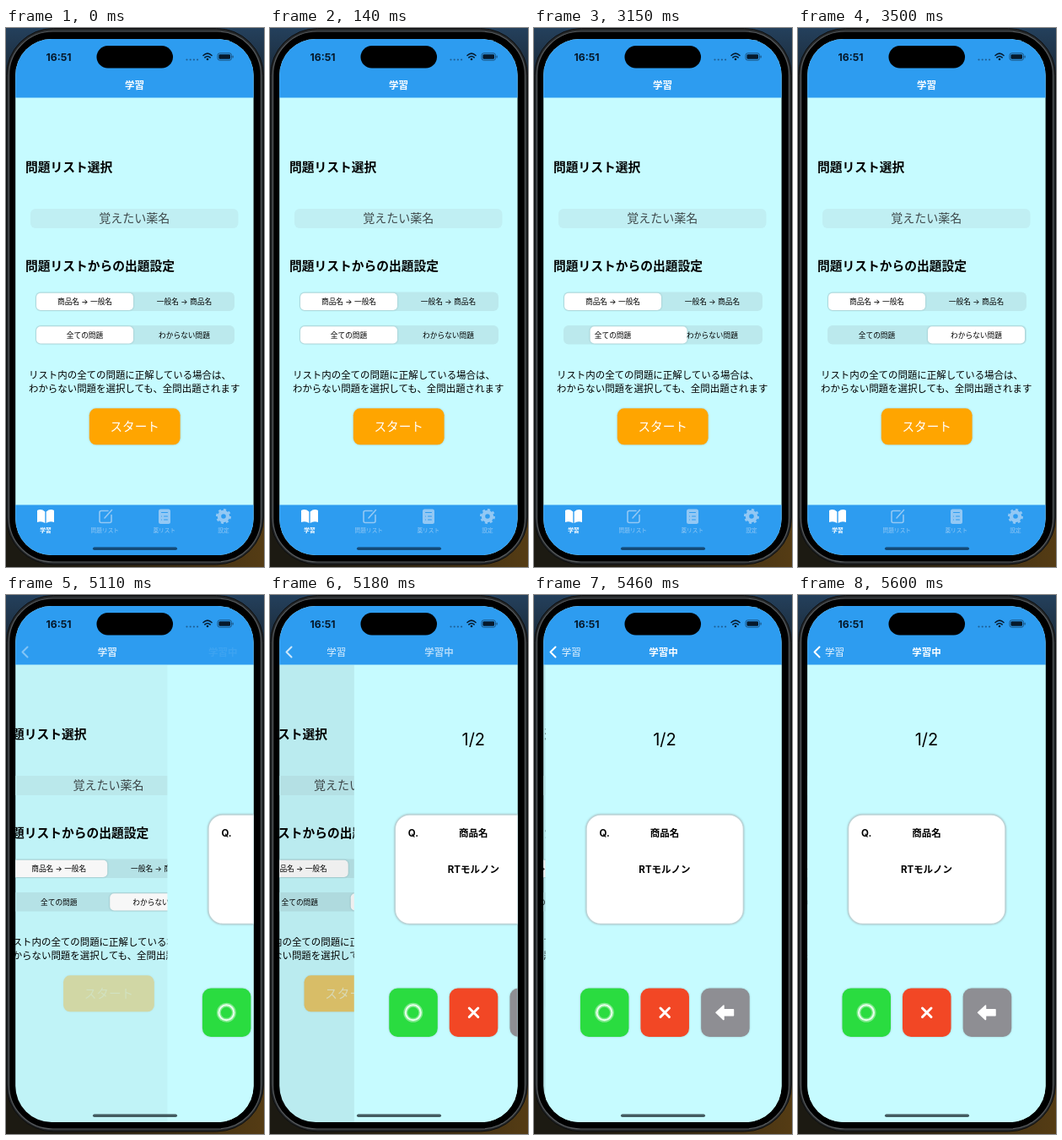
Recreate the animation shown at these times as an HTML page. Size 306 px wide and 638 px high, loop 9.94 s.

```html
<!DOCTYPE html>
<html lang="ja">
<head>
<meta charset="utf-8">
<title>学習</title>
<style>
  html, body { margin: 0; width: 100%; height: 100%; overflow: hidden; background: #000; }
  svg { display: block; width: 306px; height: 638px; }
  text { font-family: Inter, "Noto Sans CJK JP", "Noto Sans CJK", sans-serif; }
  .mid { text-anchor: middle; }
  .bold { font-weight: 700; }
  .h { font-size: 14.75px; font-weight: 700; }
  .nav { font-size: 11.5px; fill: #fff; }
  .seg { font-size: 8.7px; }
  .body { font-size: 11.45px; }
  .card { font-size: 11.5px; font-weight: 700; }
  .tab { font-size: 6.7px; }
  .thumb { fill: #fff; filter: drop-shadow(0 .5px 1px #0003); }
  .soft { filter: drop-shadow(.5px .5px 1px #0003); }
  .line { fill: none; stroke-linecap: round; stroke-linejoin: round; }
</style>
</head>
<body>
<svg viewBox="0 0 306 638">
  <defs>
    <linearGradient id="desk" x2="0" y2="1">
      <stop offset="0" stop-color="#24405c"/>
      <stop offset=".12" stop-color="#18222c"/>
      <stop offset="1" stop-color="#14130f"/>
    </linearGradient>
    <linearGradient id="wood">
      <stop offset=".2" stop-color="#1c1a12"/>
      <stop offset="1" stop-color="#553c14"/>
    </linearGradient>
    <clipPath id="screen"><rect x="11.2" y="13" width="282.4" height="611" rx="43"/></clipPath>
  </defs>

  <rect width="306" height="638" fill="url(#desk)"/>
  <rect y="575" width="306" height="63" fill="url(#wood)"/>
  <rect x=".5" y=".5" width="305" height="634.5" rx="56" fill="#25282a" stroke="#0c0d0e"/>
  <rect x="3.5" y="4" width="299" height="628" rx="52" fill="#000" stroke="#55595c" stroke-width="1.2"/>

  <g clip-path="url(#screen)">
    <rect y="13" width="306" height="611" fill="#c6fbff"/>

    <g id="setup">
      <text class="h" x="23" y="170">問題リスト選択</text>
      <rect x="29" y="214" width="246.500" height="23" rx="6" fill="#c0eff3"/>
      <text class="mid" x="152.300" y="230.400" font-size="14" fill="#3f4a4c">覚えたい薬名</text>
      <text class="h" x="23" y="287">問題リストからの出題設定</text>

      <rect x="35" y="312.500" width="236" height="22.500" rx="6" fill="#bbe9ed"/>
      <rect class="thumb" x="36" y="313.700" width="115" height="20.200" rx="5"/>
      <text class="seg mid" x="93.500" y="327.300" font-weight="500">商品名 → 一般名</text>
      <text class="seg mid" x="211.500" y="327.300">一般名 → 商品名</text>

      <rect x="35" y="352" width="236" height="22.500" rx="6" fill="#bbe9ed"/>
      <rect class="thumb" id="thumb" x="36" y="353.200" width="115" height="20.200" rx="5"/>
      <text class="seg mid" id="all" x="93.500" y="366.800">全ての問題</text>
      <text class="seg mid" id="unknown" x="211.500" y="366.800">わからない問題</text>

      <text class="body" x="27" y="414.600">リスト内の全ての問題に正解している場合は、</text>
      <text class="body" x="27" y="430.600">わからない問題を選択しても、全問出題されます</text>
      <g id="start">
        <rect class="soft" x="98.800" y="450.300" width="107.800" height="43" rx="8" fill="#ffa500"/>
        <text class="mid" id="startLabel" x="152.700" y="476.800" font-size="14.6" font-weight="500" fill="#fff">スタート</text>
      </g>
    </g>
    <rect id="dim" y="82.500" width="306" height="541.500"/>

    <g id="quiz">
      <rect x="11" y="82.500" width="283" height="541.500" fill="#c6fbff"/>
      <text class="mid" x="152.500" y="178" font-size="20">1/2</text>
      <rect class="soft" x="59.500" y="260" width="186.500" height="129.500" rx="17" fill="#fff" stroke="#bcd3d6" stroke-width="1.5"/>
      <text class="card" x="75" y="286">Q.</text>
      <text class="card mid" x="152.500" y="286">商品名</text>
      <text class="card mid" x="152.500" y="329">RTモルノン</text>
      <g class="soft">
        <rect x="52.500" y="465.500" width="57.500" height="57.500" rx="10" fill="#2adc40"/>
        <rect x="124" y="465.500" width="57.500" height="57.500" rx="10" fill="#f24725"/>
        <rect x="195.700" y="465.500" width="57.500" height="57.500" rx="10" fill="#8e8e93"/>
      </g>
      <circle class="line" cx="81" cy="494.300" r="9" stroke="#fff" stroke-opacity=".4" stroke-width="5"/>
      <circle class="line" cx="81" cy="494.300" r="9" stroke="#e9ffec" stroke-width="2"/>
      <path class="line" d="M147.500 489l10.500 10.500m0-10.500l-10.500 10.500" stroke="#fff" stroke-width="3"/>
      <path d="M213.500 494.300l9-8.300v4.800h11.500v7h-11.500v4.800z" fill="#fff" stroke="#fff" stroke-width="1.500" stroke-linejoin="round"/>
    </g>

    <rect y="13" width="306" height="69.500" fill="#2d9cf0"/>
    <path class="line" id="chevron" d="M25.500 61.500l-6 6 6 6" stroke="#fff" stroke-width="2"/>
    <text class="nav mid" id="home" y="71.800">学習</text>
    <text class="nav mid bold" id="title" y="71.800">学習中</text>

    <g id="tabs">
      <rect y="564.500" width="306" height="60" fill="#2d9cf0"/>
      <g fill="#fff">
        <path d="M46.300 572.500q-4.500-4-9.300-1.500v14q5-2 9.300 1zM47.700 572.500q4.500-4 9.300-1.500v14q-5-2-9.300 1z"/>
        <text class="tab mid bold" x="47" y="596.600">学習</text>
      </g>
      <g fill="#93c8f4">
        <path class="line" d="M121 571.500h-8q-2 0-2 2v10q0 2 2 2h10q2 0 2-2v-7M117 580l8.500-9.500" stroke="#93c8f4" stroke-width="1.600"/>
        <text class="tab mid" x="117.300" y="596.600">問題リスト</text>
        <rect x="181" y="569.500" width="14" height="17.500" rx="2.500"/>
        <path class="line" d="M184.500 573.500h7M184.500 578h.1M187.500 578h4M184.500 582h.1M187.500 582h4" stroke="#2d9cf0" stroke-width="1.100"/>
        <text class="tab mid" x="187.800" y="596.600">薬リスト</text>
        <circle class="line" cx="258" cy="578" r="5" stroke="#93c8f4" stroke-width="4.400"/>
        <circle cx="258" cy="578" r="7.800" fill="none" stroke="#93c8f4" stroke-width="2.400" pathLength="16" stroke-dasharray="1"/>
        <text class="tab mid" x="258" y="596.600">設定</text>
      </g>
    </g>
    <rect id="bar" x="103" y="614.500" width="100" height="3.500" rx="1.750"/>

    <g fill="#06192b">
      <text class="bold" x="47.500" y="38.500" font-size="12.2">16:51</text>
      <path class="line" d="M214.500 37.500h13" stroke="#1c5d94" stroke-width="2.200" stroke-dasharray="0 4.200"/>
      <path class="line" d="M234 32.500q5-4.600 10 0M235.900 34.900q3.100-2.800 6.200 0" stroke="#06192b" stroke-width="1.600"/>
      <circle cx="239" cy="37" r="1.300"/>
      <rect x="251" y="29.800" width="16.500" height="8.400" rx="2.500" fill="none" stroke="#1b5482"/>
      <rect x="252.400" y="31.200" width="13.700" height="5.600" rx="1.400"/>
      <rect x="268.500" y="32.500" width="1.200" height="3" rx=".6" fill="#1b5482"/>
    </g>
    <rect x="107.500" y="21" width="90.500" height="26.500" rx="13.250"/>
  </g>
</svg>
<script>
const LOOP = 9940, STEP = 70, SLIDE = 3010, PUSH = 5110, WIDTH = 283;
const el = id => document.getElementById(id);
const set = (id, attrs) => {
  for (const name in attrs) el(id).setAttribute(name, attrs[name]);
};
const clamp = v => Math.min(1, Math.max(0, v));
const smooth = v => v * v * (3 - 2 * v);
const shift = x => `translate(${x})`;

// Share of the page push still to go: a critically damped spring
function remaining(ms) {
  if (ms < 0) return 1;
  if (ms >= 490) return 0;
  const x = 1.27 + ms * 0.0158;
  return (1 + x) * Math.exp(-x);
}

function draw(t) {
  const slide = smooth(clamp((t - SLIDE) / 420));
  set('thumb', { x: 36 + 118 * slide });
  set('all', { 'font-weight': slide < 0.5 ? 500 : 400 });
  set('unknown', { 'font-weight': slide < 0.5 ? 400 : 500 });

  const pushed = t >= PUSH;
  const rest = remaining(t - PUSH), done = 1 - rest;
  const navRest = rest ** 1.1;
  set('setup', { transform: shift(-0.3 * WIDTH * done) });
  set('quiz', { transform: shift(WIDTH * rest) });
  set('dim', { opacity: 0.09 * done });

  const press = pushed ? clamp(0.33 + (t - PUSH) / 300) : 1;
  set('start', { opacity: press });
  set('startLabel', { opacity: press });

  set('chevron', { opacity: clamp(done * 1.1) });
  set('home', {
    x: pushed ? 43.5 + 126 * navRest : 152.5,
    'font-weight': done < 0.5 ? 700 : 400,
    opacity: pushed ? 0.75 + 0.15 * done : 1
  });
  set('title', { x: 152.5 + 172 * navRest, opacity: clamp((done - 0.32) * 1.7) });

  set('tabs', { visibility: pushed ? 'hidden' : 'visible' });
  set('bar', { fill: pushed ? '#435b60' : '#134a78' });
}

const begin = performance.now();
function tick() {
  const t = (performance.now() - begin) % LOOP;
  draw(Math.floor(t / STEP) * STEP);
  requestAnimationFrame(tick);
}
tick();
</script>
</body>
</html>
```
